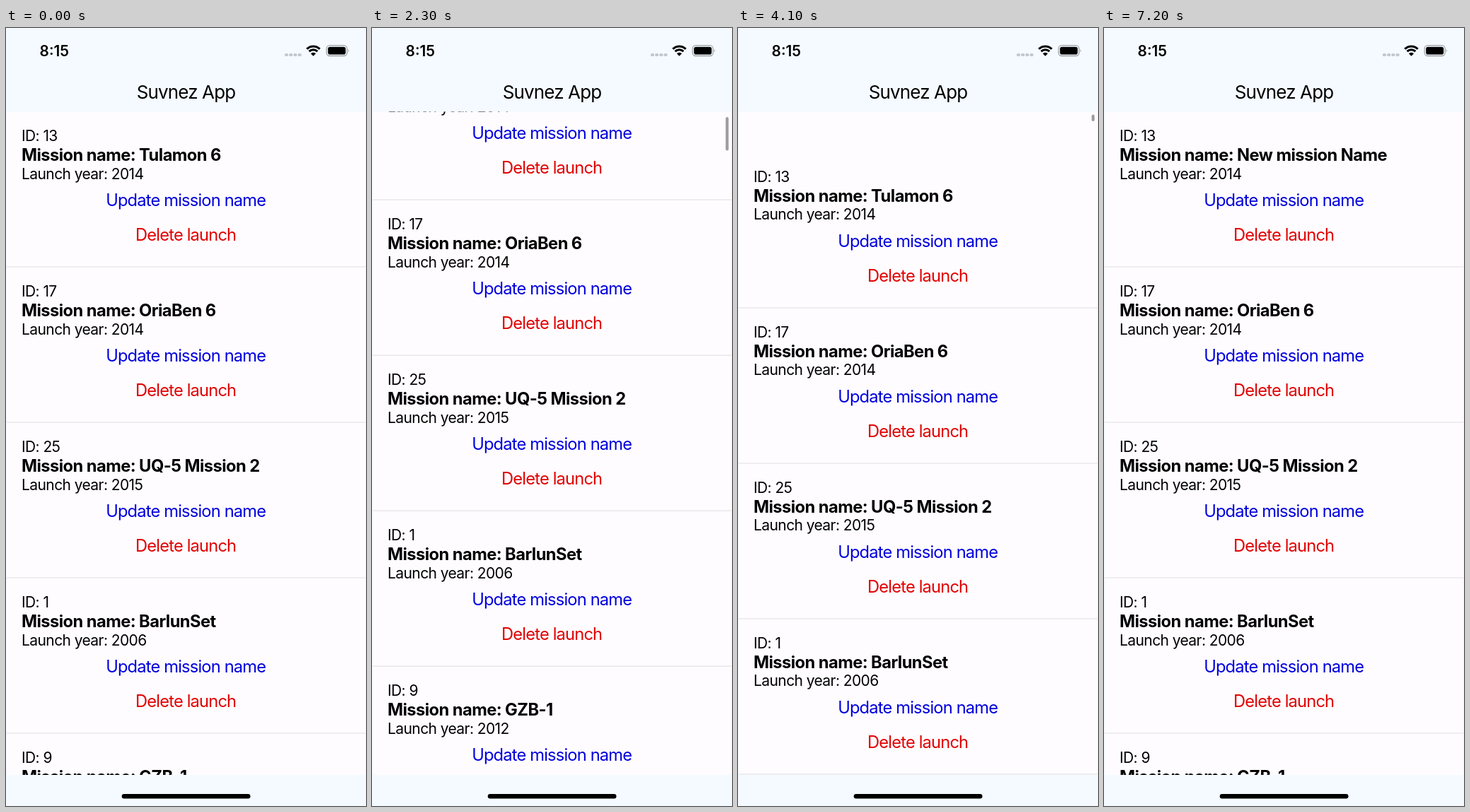
Recreate the animation shown at these times as an HTML page. Size 509 by 1101 pixels, loop 8 s.

```html
<!DOCTYPE html>
<html lang="en">
<head>
<meta charset="utf-8">
<title>Launch list</title>
<style>
  html, body { margin: 0; height: 100%; overflow: hidden; background: #f4faff; }
  svg { display: block; }
  text { font: 21px Inter, "Noto Sans", sans-serif; letter-spacing: -.028em; white-space: pre; }
  .clock { font-size: 20.8px; font-weight: 600; letter-spacing: 0; }
  .title { font-size: 26px; letter-spacing: -.034em; }
  .name { font-size: 23.7px; font-weight: 700; letter-spacing: -.024em; }
  .update, .delete { font-size: 23.7px; letter-spacing: -.035em; }
  .title, .update, .delete { text-anchor: middle; }
  .update { fill: #0000dc; }
  .delete { fill: #e10000; }
</style>
</head>
<body>
<svg width="509" height="1101" viewBox="0 0 509 1101">
  <clipPath id="view"><rect x="1" y="118.5" width="507" height="938.5"/></clipPath>
  <text class="clock" x="47.6" y="40">8:15</text>
  <g fill="#c3c8cd">
    <rect x="394" y="36" width="5" height="4" rx="1.5"/>
    <rect x="400.2" y="36" width="5" height="4" rx="1.5"/>
    <rect x="406.4" y="36" width="5" height="4" rx="1.5"/>
    <rect x="412.6" y="36" width="5" height="4" rx="1.5"/>
  </g>
  <path d="M425.3 29.8A13 13 0 0 1 443.7 29.8M428.6 33.1A8.3 8.3 0 0 1 440.4 33.1"
        fill="none" stroke="#000" stroke-width="3"/>
  <path d="M434.5 39.8L431 36.2A5 5 0 0 1 438 36.2Z"/>
  <rect x="453.2" y="24.7" width="29" height="14.8" rx="4.5" fill="none" stroke="#9ea2a6" stroke-width="1.3"/>
  <rect x="455.2" y="26.7" width="25" height="10.8" rx="2.8"/>
  <path d="M483.8 29.7Q486 32 483.8 34.6Z" fill="#9ea2a6"/>
  <text class="title" x="254.5" y="100">Suvnez App</text>
  <g clip-path="url(#view)">
    <rect y="118" width="509" height="940" fill="#fefcff"/>
    <g id="list"></g>
    <rect id="bar" x="500" width="4.2" rx="2.1" fill="#a09fa2"/>
  </g>
  <rect x="163.7" y="1084" width="181.8" height="6.5" rx="3.25"/>
</svg>
<script>
const launches = [
  [13, 'Tulamon 6', 2014],
  [17, 'OriaBen 6', 2014],
  [25, 'UQ-5 Mission 2', 2015],
  [1, 'BarlunSet', 2006],
  [9, 'GZB-1', 2012]
];
const list = document.getElementById('list');
const bar = document.getElementById('bar');

list.innerHTML = launches.map(([id, name, year], i) => `
  <g transform="translate(0 ${i * 220})">
    <text x="22" y="160">ID: ${id}</text>
    <text class="name" x="22" y="188">Mission name: ${name}</text>
    <text x="22" y="213.5">Launch year: ${year}</text>
    <text class="update" x="254.2" y="252">Update mission name</text>
    <text class="delete" x="254.2" y="301">Delete launch</text>
    <rect y="337.3" width="509" height="1.4" fill="#e8e7ea"/>
  </g>`).join('');
const firstName = list.querySelector('.name');
const firstUpdate = list.querySelector('.update');

const smooth = p => p * p * (3 - 2 * p);
const clamp = x => Math.max(0, Math.min(1, x));
const bounce = ms => (1 + ms * .0087) * Math.exp(-ms * .0087);

// Finger drags as [time, scroll offset]; negative pulls past the top.
const drags = [
  [1100, 0], [1800, 176], [2050, 180], [2700, -78], [2800, -78],
  [2900, -82], [3000, -85], [3100, -82]
];

function scrollAt(t) {
  if (t < 1100 || t >= 5000) return 0;
  if (t >= 4300) return -77.3 * bounce(t - 4300);
  if (t >= 3700) return -2.8 - 74.5 * smooth((t - 3700) / 600);
  if (t >= 3100) return -82 * bounce(t - 3100);
  const i = drags.findIndex(d => d[0] > t);
  const [t0, a] = drags[i - 1], [t1, b] = drags[i];
  return a + (b - a) * smooth((t - t0) / (t1 - t0));
}

function draw(t) {
  const y = scrollAt(t);
  list.setAttribute('transform', `translate(0 ${-y})`);
  bar.setAttribute('y', 122.5 + Math.max(0, y) * .037);
  bar.setAttribute('height', Math.max(9.5, 47.5 + Math.min(0, y)));
  const fade = clamp((t - 6800) / 400);
  bar.setAttribute('opacity', t < 1200 ? 0 : 1 - fade);
  firstUpdate.setAttribute('opacity', t < 5800 ? 1 : .22 + .78 * smooth(fade));
  firstName.textContent = 'Mission name: ' + (t < 7000 ? launches[0][1] : 'New mission Name');
}

let start;
function tick(now) {
  start ??= now;
  draw(Math.floor((now - start) % 8000 / 100) * 100);
  requestAnimationFrame(tick);
}
draw(0);
requestAnimationFrame(tick);
</script>
</body>
</html>
```
